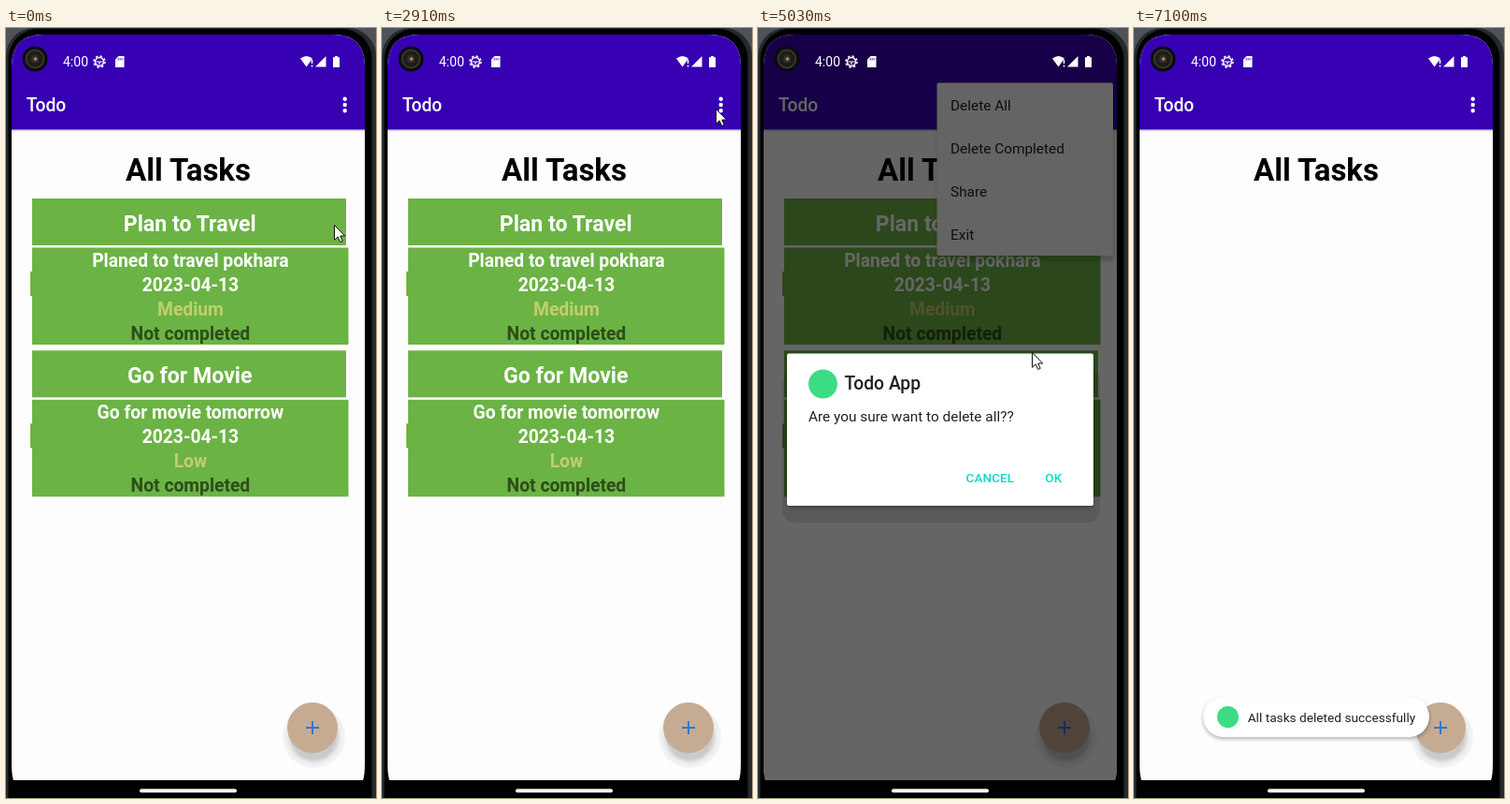
An HTML page that plays this animation: 396x822 px, repeating every 8.12 s.

```html
<!DOCTYPE html>
<html lang="en">
<head>
<meta charset="utf-8">
<title>Todo</title>
<style>
  html, body { margin: 0; width: 100%; height: 100%; overflow: hidden; background: #000; }
  svg { display: block; width: 396px; height: 822px; font-family: Roboto, "Liberation Sans", sans-serif; }
  .mid { text-anchor: middle; font-weight: 700; fill: #fff; }
  .head { font-size: 23.1px; }
  .row { font-size: 19.3px; }
  .level { fill: #c3cd6d; }
  .state { fill: #2c4d1a; }
  .bar { font-size: 19.3px; font-weight: 500; }
  .item { font-size: 15.4px; fill: #212121; }
  .button { font-size: 13.5px; font-weight: 500; letter-spacing: .1px; fill: #0ed9c6; }
</style>
</head>
<body>
<svg viewBox="0 0 396 822">
  <defs>
    <clipPath id="screen"><path d="M6 41Q6 7 40 7H350Q384 7 384 41V785Q384 798 382 803H8Q6 798 6 785Z"/></clipPath>
    <clipPath id="menuClip"><path d="M170 58H380V270H170Z"/></clipPath>
    <clipPath id="firstItem"><path d="M191.500 58.500H380V105H191.500Z"/></clipPath>
    <linearGradient id="barShade" x2="0" y2="1">
      <stop stop-color="#000" stop-opacity=".18"/><stop offset="1" stop-color="#000" stop-opacity="0"/>
    </linearGradient>
    <radialGradient id="fabShade">
      <stop offset=".7" stop-color="#000" stop-opacity=".2"/>
      <stop offset=".86" stop-color="#000" stop-opacity=".06"/>
      <stop offset="1" stop-color="#000" stop-opacity=".035"/>
    </radialGradient>
    <filter id="soft" x="-20%" y="-20%" width="140%" height="150%"><feGaussianBlur stdDeviation="2"/></filter>
  </defs>

  <!-- phone body -->
  <rect width="396" height="822" fill="#505356"/>
  <rect width="396" height="880" rx="30" fill="#26292b"/>
  <rect x="2.500" y="1" width="389" height="880" rx="32"/>
  <rect x="143" y="812.300" width="104" height="4" rx="2" fill="#f8f8f8"/>

  <g clip-path="url(#screen)">
    <rect x="6" y="7" width="378" height="796" fill="#fdfdfd"/>
    <rect x="6" y="7" width="378" height="101.500" fill="#3700b3"/>
    <rect x="6" y="108.500" width="378" height="3" fill="url(#barShade)"/>
    <text class="bar" x="21.700" y="89" fill="#fff">Todo</text>
    <circle id="dotRipple" cx="360.500" cy="82.500" r="15" fill="#fff" opacity=".2"/>
    <path d="M362.700 75.700V89" stroke="#fff" stroke-width="4.400" stroke-linecap="round" stroke-dasharray="0 6.300"/>
    <text class="mid" x="195" y="163" font-size="33">
      <tspan fill="#000">All Tasks</tspan>
    </text>
    <g id="tasks"></g>

    <circle cx="329.500" cy="756.500" r="33.500" fill="url(#fabShade)"/>
    <circle cx="328" cy="747" r="27" fill="#c4ab91"/>
    <path d="M321 747H335M328 740V754" stroke="#3377d6" stroke-width="2"/>

    <g id="menu">
      <rect x="192" y="64" width="189.500" height="185" rx="4" opacity=".16" filter="url(#soft)"/>
      <g clip-path="url(#menuClip)">
        <g id="menuBody">
          <rect x="191.500" y="58.500" width="188.500" height="184.500" rx="2" fill="#fafafa"/>
          <g clip-path="url(#firstItem)">
            <rect id="press" x="191.500" y="58.500" width="188.500" height="46.500"/>
            <circle id="ripple" cx="285.500" cy="81.500" opacity=".03"/>
          </g>
        </g>
      </g>
    </g>

    <g id="dialog">
      <rect x="6" y="7" width="378" height="796" opacity=".6"/>
      <rect x="26" y="365" width="340" height="163" rx="13" opacity=".11"/>
      <rect x="32" y="352" width="326" height="160" rx="3" opacity=".3" filter="url(#soft)"/>
      <rect x="31" y="347.500" width="328" height="162.500" rx="2" fill="#fff"/>
      <circle cx="69.500" cy="380" r="15.500" fill="#3ddc84"/>
      <text class="bar" x="92.500" y="386" fill="#212121">Todo App</text>
      <text class="item" x="54" y="420">Are you sure want to delete all??</text>
      <text class="button" x="222.500" y="485.300">CANCEL</text>
      <text class="button" x="307.300" y="485.300">OK</text>
    </g>

    <g id="toast">
      <rect x="74" y="716" width="242" height="43" rx="21.500" opacity=".3" filter="url(#soft)"/>
      <rect x="74" y="713.500" width="242" height="43.500" rx="21.750" fill="#fff"/>
      <circle cx="100.500" cy="735.500" r="11.500" fill="#3ddc84"/>
      <text x="121.700" y="740.500" font-size="13.700" fill="#222">All tasks deleted successfully</text>
    </g>
  </g>

  <!-- status bar -->
  <circle cx="31" cy="33" r="13.500" fill="#0b0b0b"/>
  <circle cx="31" cy="33" r="9.500" fill="#1c1c19" stroke="#353530" stroke-width="2"/>
  <circle cx="31" cy="33" r="4" fill="#3b332c"/>
  <circle cx="31.500" cy="33" r="1.600" fill="#b59a8c"/>
  <g fill="#fff">
    <text x="61" y="41" font-size="14">4:00</text>
    <circle cx="100" cy="36" r="4.400" fill="none" stroke="#fff" stroke-width="1.500"/>
    <circle cx="100" cy="36" r="5.900" fill="none" stroke="#fff" stroke-width="1.800" stroke-dasharray="2.300 2.330"/>
    <path d="M97 36H103M100 36V39" stroke="#fff" stroke-width="1.200"/>
    <path d="M120.500 30H126.500V42H117V33.500Z"/>
    <path d="M315 32.500Q321.500 27.500 328 32.500L321.500 41.500Z"/>
    <path d="M342.500 30V41.500H331Z"/>
    <path d="M352 30H355V31.300H357V42H350V31.300H352Z"/>
  </g>
  <path d="M327.500 34V38M327.500 39.500V41.500" stroke="#fff" stroke-width="1.500"/>
  <path d="M120.200 32V34.500M122.200 32V34.500M124.200 32V34.500" stroke="#3700b3" stroke-width=".8"/>

  <path id="cursor" d="M.5 .5V16.300L4.200 12.900L6.700 18.500L9.200 17.400L6.800 12H11.700Z" fill="#fff" stroke="#111" stroke-linejoin="round"/>
</svg>

<script>
const LOOP = 8120;
const TICK = 136.5; // the screen refreshes once per tick
const LEAD = 40;

const $ = id => document.getElementById(id);
const set = (id, name, value) => $(id).setAttribute(name, value);
const show = (id, on) => set(id, "visibility", on ? "visible" : "hidden");
const text = (cls, x, y, s) => `<text class="${cls}" x="${x}" y="${y}">${s}</text>`;
const box = (x, y, w, h) => `<rect x="${x}" y="${y}" width="${w}" height="${h}" fill="#6bb345"/>`;

function task(y, title, note, level) {
  const rows = [["", note], ["", "2023-04-13"], ["level", level], ["state", "Not completed"]];
  return box(28, y, 336, 50) + box(28, y + 52.5, 338.5, 103.5) + box(26, y + 78, 2.5, 26) +
    text("mid head", 196.7, y + 35, title) +
    rows.map(([cls, s], i) => text("mid row " + cls, 197.4, y + 73 + 26 * i, s)).join("");
}

$("tasks").innerHTML =
  task(182, "Plan to Travel", "Planed to travel pokhara", "Medium") +
  task(344.3, "Go for Movie", "Go for movie tomorrow", "Low");

["Delete All", "Delete Completed", "Share", "Exit"].forEach((s, i) =>
  $("menuBody").insertAdjacentHTML("beforeend", text("item", 206, 87.5 + 46.1 * i, s)));

const ramp = (k, from, to) => Math.min(1, Math.max(0, (k - from) / (to - from)));
const ease = p => p * p * (3 - 2 * p);

// pointer strokes: first tick, last tick, where the tip ends
const home = { x: 351, y: 210 };
const strokes = [
  [0, 4, 141, 72], [4, 5, 385, 97], [9, 15, 278, 457], [15, 18, 343, 102], [18, 21, 357, 86],
  [25, 26, 350, 92], [28, 29, 283, 74], [34, 36, 293, 346], [37, 40, 292, 494],
  [40, 43, 308, 481], [49, 51, 342, 793], [51, 52, 410, 840]
];

const pointer = k => strokes.reduce(({ x, y }, [from, to, x2, y2]) => {
  const p = ease(ramp(k, from, to));
  return { x: x + (x2 - x) * p, y: y + (y2 - y) * p };
}, home);

function draw(t) {
  const k = Math.floor((t + LEAD) / TICK);
  const { x, y } = pointer(k);
  set("cursor", "transform", `translate(${x} ${y})`);

  const open = ramp(k, 24, 27);
  const slide = 22 * (1 - open) ** 2;
  set("menu", "opacity", k < 38 ? Math.min(1, 1.5 * open) : 0);
  set("menuBody", "transform", `translate(${slide} ${-slide})`);

  const press = k < 37 ? ramp(k, 31, 36) : 0;
  set("ripple", "r", 87 * Math.sqrt(press));
  set("press", "opacity", .2 * press);

  show("dotRipple", k >= 24 && k < 27);
  show("dialog", k >= 37 && k < 48);
  show("tasks", k < 48);
  show("toast", k >= 50);
}

const start = performance.now();
function tick() {
  draw((performance.now() - start) % LOOP);
  requestAnimationFrame(tick);
}
tick();
</script>
</body>
</html>
```
